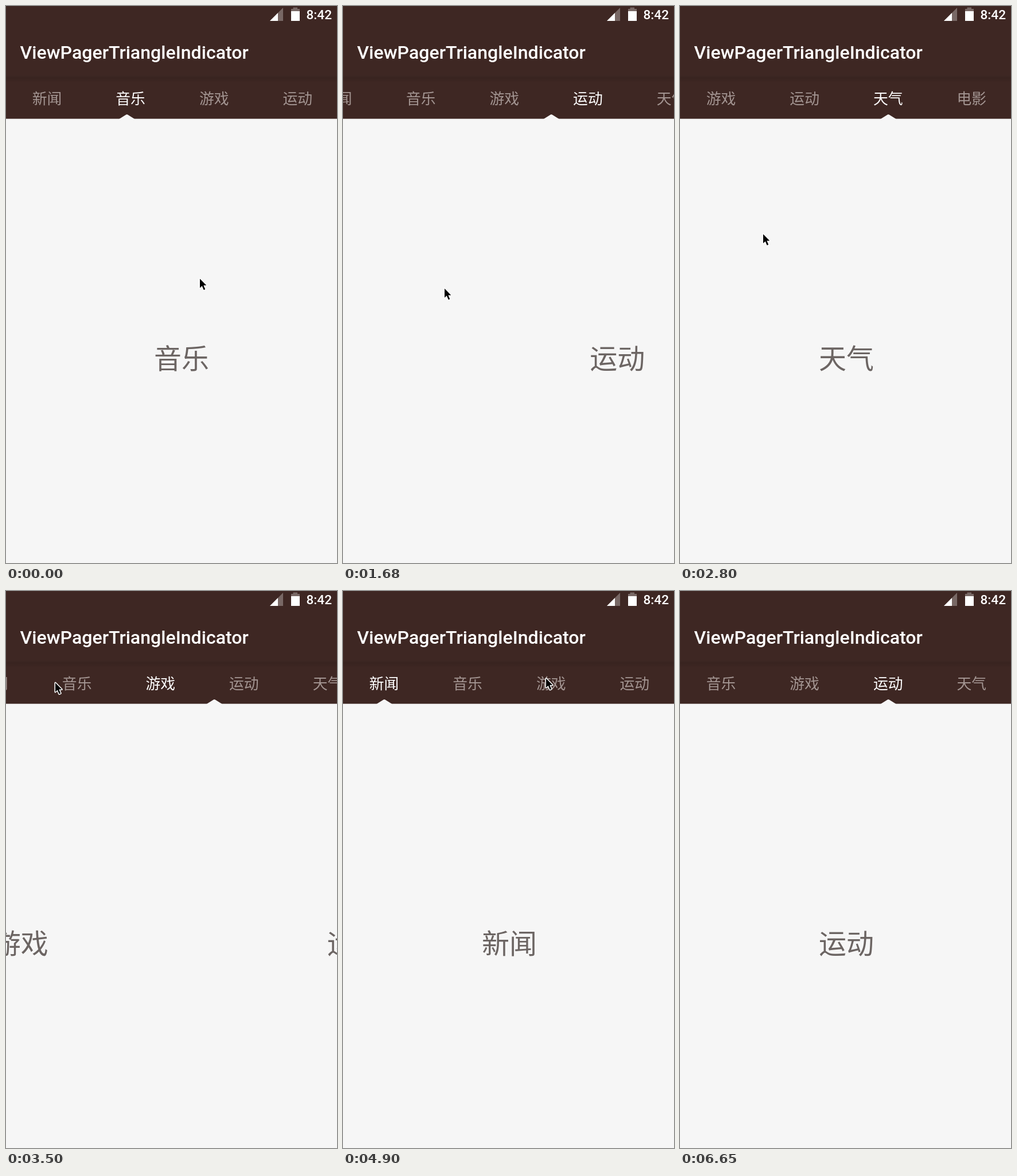
Animation, 577 px wide and 971 px high, one loop 7 s. Source, as an HTML page:

```html
<!DOCTYPE html>
<html lang="zh-CN">
<head>
<meta charset="utf-8">
<title>ViewPagerTriangleIndicator</title>
<style>
  html, body { margin: 0; width: 100%; height: 100%; overflow: hidden; background: #f6f6f6; }
  svg { display: block; width: 577px; height: 971px; }
  text { font-family: Roboto, sans-serif; font-weight: 500; fill: #fff; }
  .tab, .page { font-family: "Noto Sans CJK SC", "Noto Sans CJK", sans-serif; font-weight: 400; text-anchor: middle; }
  .tab { font-size: 25.8px; fill: #a39592; }
  .tab.on { fill: #fff; }
  .page { font-size: 48px; fill: #6c6563; }
</style>
</head>
<body>
<svg viewBox="0 0 577 971">
  <defs>
    <linearGradient id="shade" x2="0" y2="1">
      <stop offset="0" stop-opacity="0"/>
      <stop offset=".35" stop-opacity=".1"/>
      <stop offset="1" stop-opacity="0"/>
    </linearGradient>
  </defs>
  <rect width="577" height="971" fill="#f6f6f6"/>
  <g id="pages"></g>
  <rect width="577" height="196.6" fill="#3e2723"/>
  <rect y="121" width="577" height="12" fill="url(#shade)"/>
  <path d="M460 26H483V3Z" fill="#786865"/>
  <path d="M460 26H474V12Z" fill="#fff"/>
  <path d="M497 9V5H500.5V2.5H508V5H512V9Z" fill="#786865"/>
  <path d="M497 9H512V26H497Z" fill="#fff"/>
  <text x="523.5" y="23" font-size="22.6">8:42</text>
  <text x="24.5" y="91.5" font-size="32.1">ViewPagerTriangleIndicator</text>
  <g id="tabs"></g>
  <path id="mark" d="M-13 197L-1 189.5Q.5 188.5 2 189.5L14 197Z" fill="#f6f6f6"/>
  <path id="cursor" d="M1 2.500V18.500L4.700 15L7.700 22L10.300 20.900L7.400 14.100H12.300Z"
        stroke="#fff" stroke-width="3" stroke-linejoin="round" paint-order="stroke"/>
</svg>
<script>
const LOOP = 7000, STEP = 70, LAG = 16;
const TAB = 145.6, FIRST = 71.5, PAGE = 582, CENTER = 290;
const DRAG = 210, SETTLE = 280, PRESS = 100;
const NAMES = ['新闻', '音乐', '游戏', '运动', '天气', '电影'];

const $ = id => document.getElementById(id);
const shift = (el, x, y = 0) => el.setAttribute('transform', `translate(${x} ${y})`);
const smooth = k => k * k * (3 - 2 * k);
const quint = k => 1 - (1 - k) ** 5;

const moves = [], path = [];
let page = 0;

function move(at, dur, to, ease) {
  moves.push({ at, dur, from: page, to, ease });
  page = to;
}
const point = (t, x, y) => path.push({ t, x, y });
const rest = t => path.push({ ...path.at(-1), t });

// Drag left by a share of a page, let go at x, y and settle on the next page.
function swipe(at, share, x, y) {
  const next = page + 1;
  point(at, x + share * PAGE, y);
  point(at + DRAG, x, y);
  move(at, DRAG, page + share, smooth);
  move(at + DRAG, SETTLE, next, quint);
}

// Press a tab; the pager needs longer for farther pages.
function tap(at, to) {
  rest(at);
  rest(at + PRESS);
  move(at, (Math.abs(to - page) + 1) * 100, to, quint);
}

swipe(-351, 0.09, 337, 473);
rest(420);
swipe(668, 0.3, 344, 481);
point(1190, 345, 481);
swipe(1440, 0.43, 175, 490);
point(2170, 285, 496);
swipe(2352, 0.2, 169, 496);
point(3220, 85, 157.5);
tap(3423, 2);
tap(3920, 0);
point(4900, 353, 150);
tap(5010, 2);
point(5530, 510, 171);
tap(5781, 3);
point(6650, 534, 990);

const currentMove = t => moves.findLast(m => m.at <= t);

function position(t) {
  const { at, dur, from, to, ease } = currentMove(t);
  return from + (to - from) * ease(Math.min(1, (t - at) / dur));
}

function pointerAt(t) {
  const i = path.findIndex(p => p.t > t);
  if (i < 0) return path.at(-1);
  const a = path[i - 1], b = path[i];
  const k = smooth((t - a.t) / (b.t - a.t));
  return { x: a.x + (b.x - a.x) * k, y: a.y + (b.y - a.y) * k };
}

function label(parent, cls, y, name) {
  const el = document.createElementNS('http://www.w3.org/2000/svg', 'text');
  el.setAttribute('class', cls);
  el.setAttribute('y', y);
  el.textContent = name;
  return $(parent).appendChild(el);
}
const tabs = NAMES.map(n => label('tabs', 'tab', 170.5, n));
const pages = NAMES.map(n => label('pages', 'page', 632, n));

function draw(t) {
  const pos = position(t), bar = position(t - LAG);
  const scroll = Math.max(0, bar - 2);
  const selected = Math.round(currentMove(t).to);
  const tip = pointerAt(t);
  tabs.forEach((el, i) => {
    shift(el, FIRST + (i - scroll) * TAB);
    el.classList.toggle('on', i === selected);
  });
  pages.forEach((el, i) => shift(el, CENTER + (i - pos) * PAGE));
  shift($('mark'), FIRST + (bar - scroll) * TAB);
  shift($('cursor'), tip.x, tip.y);
}

const begin = performance.now();
function tick() {
  const t = (performance.now() - begin) % LOOP;
  draw(Math.floor(t / STEP) * STEP);
  requestAnimationFrame(tick);
}
tick();
</script>
</body>
</html>
```
